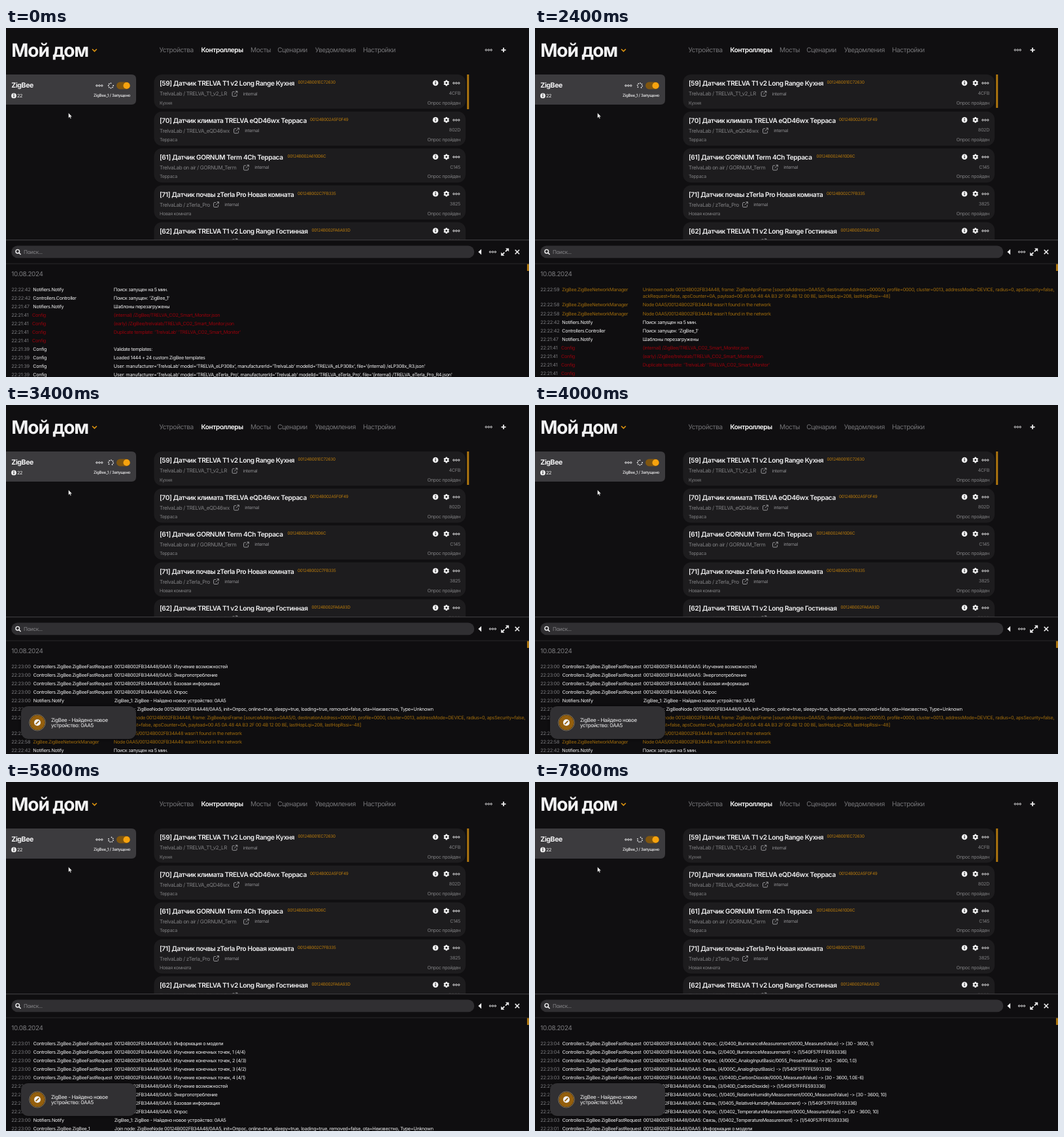
These frames come from a looping animation (800 by 533 pixels, 8000 ms). An HTML page:

```html
<!DOCTYPE html>
<html lang="ru">
<head>
<meta charset="utf-8">
<title>Мой дом</title>
<style>
  html, body { margin: 0; width: 100%; height: 100%; overflow: hidden; background: #100f11; }
  svg { display: block; width: 100%; height: 100%; }
  text { font-family: Inter, Roboto, sans-serif; letter-spacing: -.04em; text-rendering: geometricPrecision; }
</style>
</head>
<body>
<svg id="stage" viewBox="0 0 800 533" xmlns="http://www.w3.org/2000/svg"></svg>
<script>
const WHITE = '#f2f2f3', GRAY = '#808083', ORANGE = '#b87a0c', RED = '#98000b', AMBER = '#a06c0c', THUMB = '#ad760f';
const LOOP = 8000, TICK = 200;

// Drawing helpers returning SVG markup
const text = (x, y, size, fill, str, extra = '') =>
  `<text x="${x}" y="${y}" font-size="${size}" fill="${fill}" ${extra}>${str}</text>`;
const rect = (x, y, w, h, r, fill, extra = '') =>
  `<rect x="${x}" y="${y}" width="${w}" height="${h}" rx="${r}" fill="${fill}" ${extra}/>`;
const circle = (x, y, r, fill, extra = '') =>
  `<circle cx="${x}" cy="${y}" r="${r}" fill="${fill}" ${extra}/>`;
const line = (d, color, width = 1) =>
  `<path d="${d}" fill="none" stroke="${color}" stroke-width="${width}"/>`;
const shape = (d, fill, extra = '') => `<path d="${d}" fill="${fill}" ${extra}/>`;

const bold = 'font-weight="600"', heavy = 'font-weight="700"', right = 'text-anchor="end"';
const dots = (x, y) => [-3.9, 0, 3.9].map(dx =>
  circle(x + dx, y, 1.25, 'none', `stroke="${WHITE}" stroke-width=".9"`)).join('');
const info = (x, y, r) => circle(x, y, r, WHITE) +
  rect(x - .6, y - .8, 1.2, 3, 0, '#1c1b1d') + circle(x, y - 2.1, .75, '#1c1b1d');

function gear(x, y) {
  const teeth = [0, 60, 120].map(a =>
    rect(x - 1.2, y - 4.4, 2.4, 8.8, .5, WHITE, `transform="rotate(${a} ${x} ${y})"`)).join('');
  return teeth + circle(x, y, 3.4, WHITE) + circle(x, y, 1.4, '#1c1b1d');
}

const external = (x, y) =>
  line(`M${x - .5} ${y - 3}h-2.2q-1.2 0-1.2 1.2v4.6q0 1.2 1.2 1.2h4.6q1.2 0 1.2-1.2v-2.2` +
       `M${x - .8} ${y + .8}l4.6-4.6m-2.8 0h2.9v2.9`, '#98989b', 1);

const devices = [
  { title: '[59] Датчик TRELVA T1 v2 Long Range Кухня', id: '00124B001EC72630', idX: 446.5,
    model: 'TrelvaLab / TRELVA_T1_v2_LR', iconX: 350, room: 'Кухня', code: '4CFB' },
  { title: '[70] Датчик климата TRELVA eQD46wx Терраса', id: '00124B002A5F0F49', idX: 465,
    model: 'TrelvaLab / TRELVA_eQD46wx', iconX: 352.5, room: 'Терраса', code: '802D' },
  { title: '[61] Датчик GORNUM Term 4Ch Терраса', id: '00124B002A610D6C', idX: 430.5,
    model: 'TrelvaLab on air / GORNUM_Term', iconX: 367.5, room: 'Терраса', code: 'C145' },
  { title: '[71] Датчик почвы zTerla Pro Новая комната', id: '00124B002C7FB335', idX: 446,
    model: 'TrelvaLab / zTerla_Pro', iconX: 321.5, room: 'Новая комната', code: '3825' },
  { title: '[62] Датчик TRELVA T1 v2 Long Range Гостинная', id: '00124B002FA6A93D', idX: 467.5,
    model: 'TrelvaLab / TRELVA_T1_v2_LR', iconX: 350, room: 'Гостинная', code: '5C0C' },
];

const deviceCard = (d, i) => {
  const y = 71 + i * 56.4;
  return rect(226.5, y, 476.5, 52.3, 12, '#1d1c1e') +
    text(235, y + 17.3, 10.15, WHITE, d.title, bold) +
    text(d.idX, y + 14.3, 6.4, ORANGE, d.id) +
    text(235, y + 32.4, 8, GRAY, d.model) +
    external(d.iconX, y + 29.3) +
    text(d.iconX + 12.7, y + 31.6, 6.8, '#929295', 'internal') +
    text(235, y + 45.6, 7.05, GRAY, d.room) +
    info(657, y + 13, 4.3) + gear(673.7, y + 13) + dots(688.8, y + 13.2) +
    text(695, y + 31, 7.1, GRAY, d.code, right) +
    text(695, y + 45.6, 7.15, GRAY, 'Опрос пройден', right);
};

const tabs = [[234.5, 'Устройства'], [298.5, 'Контроллеры'], [374, 'Мосты'],
  [415.3, 'Сценарии'], [472.7, 'Уведомления'], [546, 'Настройки']];

const header = text(8.3, 43.6, 28.1, WHITE, 'Мой дом', heavy) +
  line('M132 32.2l3.4 3.4 3.4-3.4', '#e0960f', 1.5) +
  tabs.map(([x, name], i) => text(x, 36.9, 10.1, i === 1 ? '#fff' : '#747477', name, i === 1 ? bold : '')).join('') +
  dots(738.3, 33.6) + line('M757.6 33.6h7M761.1 30.1v7', WHITE, 1.7);

const sidebar = shape('M0 71H192q7 0 7 7V110q0 7-7 7H0z', '#3c3b3e') +
  text(8.3, 91, 10.6, WHITE, 'ZigBee', heavy) + info(12, 103.4, 3.9) +
  text(17, 106, 7.2, WHITE, '22') + dots(142.8, 88) +
  text(190.3, 105.4, 6.1, WHITE, 'ZigBee_1 / Запущено', right + ' font-weight="500"') +
  rect(169, 82.6, 21, 10.8, 5.4, '#805610') + circle(184.5, 88, 5.1, '#f6a30f');

// Seven dots around a circle, with the upper right one missing
const spinner = [0, 90, 135, 180, 225, 270, 315].map(a => {
  const r = a * Math.PI / 180;
  return circle((3.7 * Math.sin(r)).toFixed(2), (-3.7 * Math.cos(r)).toFixed(2), .9, WHITE);
}).join('');

const logPanel = rect(0, 323.5, 800, 210, 0, '#0f0e10') +
  line('M0 323.8H800', '#464548', 1) + line('M0 360H800', '#29282a', 1) +
  rect(8.3, 332.6, 708, 18.6, 9.3, '#302f32') +
  circle(17.8, 341.2, 2.8, 'none', `stroke="${WHITE}" stroke-width="1.4"`) + line('M19.8 343.2l2.8 2.8', WHITE, 1.6) +
  text(27, 345, 8, '#858588', 'Поиск...') +
  shape('M722.4 342l4.7-4.3v8.6z', WHITE) + dots(744.5, 342) +
  shape('M764 336.4h5.2v5.2zM762.4 347.8h-5.2v-5.2z', WHITE) +
  line('M767.5 338l-3.4 3.4M759 346.2l3.4-3.4', WHITE, 1.8) +
  line('M778.8 338.8l6.4 6.4m0-6.4l-6.4 6.4', WHITE, 1.6) +
  text(8.3, 379.4, 9.9, '#7c7c7f', '10.08.2024') +
  rect(797, 360.5, 3, 10.5, 0, THUMB);

const toast = rect(23, 460, 176, 50, 11, '#313033', 'filter="url(#shadow)"') +
  circle(48, 485, 12.2, '#1c1710', 'stroke="#b9a47e" stroke-width=".7"') +
  circle(48, 485, 11.3, '#945f0d') + circle(48, 485, 5, WHITE) + line('M45.6 487.4l4.8-4.8', '#945f0d', 1.6) +
  text(69, 483.6, 7.95, WHITE, 'ZigBee - Найдено новое') + text(69, 492.2, 7.95, WHITE, 'устройство: 0AA5');

const pageScrollbar = rect(793, 0, 7, 533, 0, '#f5f5f5') + rect(794.6, 9, 3.8, 515, 1.9, '#8c8c8c') +
  shape('M794.5 6.5h4l-2-3zM794.5 526.8h4l-2 3z', '#777');

// Log entries, newest first
const node = '00124B002FB34A48', manager = 'ZigBee.ZigBeeNetworkManager';
const fast = (sec, msg) => ({ time: '22:23:0' + sec, name: 'Controllers.ZigBee.ZigBeeFastRequest', lines: [`${node}/0AA5: ${msg}`] });
const entry = (time, name, msg, color = WHITE) => ({ time, name, lines: msg.split('\n'), color });
const bind = (sec, cluster) => fast(sec, `Связь, (${cluster}) -> (1/540F57FFFE593336)`);
const poll = (sec, attr, step) => fast(sec, `Опрос, (${attr}) -> (30 - 3600, ${step})`);
const config = msg => entry('22:21:41', 'Config', msg, RED);
const missing = entry('22:22:58', manager, `Node 0AA5/${node} wasn't found in the network`, AMBER);
const user = (model, file) => entry('22:21:39', 'Config', `User: manufacturer='TrelvaLab' model='TRELVA_${model}', ` +
  `manufacturerId='TrelvaLab' modelId='TRELVA_${model}', file='(internal) /${file}.json'`);

const log = [
  poll(4, '2/0400_IlluminanceMeasurement/0000_MeasuredValue', '1'),
  bind(4, '2/0400_IlluminanceMeasurement'),
  poll(4, '4/000C_AnalogInputBasic/0055_PresentValue', '1.0'),
  bind(3, '4/000C_AnalogInputBasic'),
  poll(3, '3/040D_CarbonDioxide/0000_MeasuredValue', '1.0E-6'),
  bind(3, '3/040D_CarbonDioxide'),
  poll(3, '1/0405_RelativeHumidityMeasurement/0000_MeasuredValue', '10'),
  bind(3, '1/0405_RelativeHumidityMeasurement'),
  poll(3, '1/0402_TemperatureMeasurement/0000_MeasuredValue', '10'),
  bind(3, '1/0402_TemperatureMeasurement'),
  fast(1, 'Информация о модели'),
  ...[1, 2, 3, 4].map(n => fast(0, `Изучение конечных точек, ${n} (4/${5 - n})`)),
  ...['Изучение возможностей', 'Энергопотребление', 'Базовая информация', 'Опрос'].map(msg => fast(0, msg)),
  entry('22:23:00', 'Notifiers.Notify', 'ZigBee_1: ZigBee - Найдено новое устройство: 0AA5'),
  entry('22:23:00', 'Controllers.ZigBee.ZigBee_1', `Join node: ZigBeeNode ${node}/0AA5, init=Опрос, online=true, ` +
    'sleepy=true, loading=true, removed=false, ota=Неизвестно, Type=Unknown'),
  entry('22:22:59', manager, `Unknown node ${node}, frame: ZigBeeApsFrame [sourceAddress=0AA5/0, ` +
    'destinationAddress=0000/0, profile=0000, cluster=0013, addressMode=DEVICE, radius=0, apsSecurity=false,\n' +
    'ackRequest=false, apsCounter=0A, payload=00 A5 0A 48 4A B3 2F 00 4B 12 00 8E, lastHopLqi=208, lastHopRssi=-48]', AMBER),
  missing, missing,
  entry('22:22:42', 'Notifiers.Notify', 'Поиск запущен на 5 мин.'),
  entry('22:22:42', 'Controllers.Controller', "Поиск запущен: 'ZigBee_1'"),
  entry('22:21:47', 'Notifiers.Notify', 'Шаблоны перезагружены'),
  config('(internal) /ZigBee/TRELVA_CO2_Smart_Monitor.json'),
  config('(early) /ZigBee/trelvalab/TRELVA_CO2_Smart_Monitor.json'),
  config("Duplicate template: 'TrelvaLab' 'TRELVA_CO2_Smart_Monitor'"),
  config(''),
  entry('22:21:39', 'Config', 'Validate templates:'),
  entry('22:21:39', 'Config', 'Loaded 1444 + 24 custom ZigBee templates'),
  user('eLP308x', 'eLP308x_R3'),
  user('eTerla_Pro', 'TRELVA_eTerla_Pro_R4'),
];

// [time, index of the newest visible entry]
const arrivals = [[0, 24], [2400, 21], [3200, 15], [4200, 10], [6200, 5], [7200, 0]];

function logRows(first) {
  let y = 401.6, out = '';
  for (let i = first; i < log.length && y < 545; i++) {
    const { time, name, lines, color = WHITE } = log[i];
    const shift = time.startsWith('22:23') ? 1 : time.endsWith('41') ? -1.2 : 0;
    out += text(8.3, y, 7.4, '#7c7c7f', time) + text(41.3 + Math.min(shift, .5), y, 7.2, color, name);
    lines.forEach((str, n) => out += text(164.8 + Math.max(shift, 0), y + n * 10.8, 7.25, color, str));
    y += 13.05 + (lines.length - 1) * 10.8;
  }
  return out;
}

const stage = document.getElementById('stage');
stage.innerHTML = `
  <defs>
    <clipPath id="listArea"><rect width="800" height="323.5"/></clipPath>
    <filter id="shadow" x="-10%" y="-20%" width="120%" height="140%" color-interpolation-filters="sRGB">
      <feDropShadow dx="0" dy="0" stdDeviation="2" flood-opacity=".6"/>
    </filter>
  </defs>
  ${rect(0, 0, 800, 533, 0, '#100f11')}${header}${sidebar}
  <g id="spinner">${spinner}</g>
  <g clip-path="url(#listArea)">${devices.map(deviceCard).join('')}</g>
  ${rect(705.2, 71, 3, 53, 0, THUMB, 'id="listThumb"')}
  ${logPanel}<g id="rows"></g><g id="toast">${toast}</g><g id="pageScrollbar">${pageScrollbar}</g>
  ${shape('M95.6 129.8v7.6l1.7-1.6 1.3 2.8 1.2-.6-1.2-2.6h2.4z', '#fff', 'stroke="#222" stroke-width=".4"')}`;

const part = Object.fromEntries(['spinner', 'listThumb', 'rows', 'toast', 'pageScrollbar']
  .map(id => [id, document.getElementById(id)]));
const show = (el, visible) => el.setAttribute('visibility', visible ? 'visible' : 'hidden');
let shownFirst = -1;

function render(now) {
  const t = Math.floor(now % LOOP / TICK) * TICK;

  part.spinner.setAttribute('transform', `translate(160.4 88) rotate(${t * .36})`);
  part.listThumb.setAttribute('height', t < 1800 ? 53 : 51);

  const first = arrivals.findLast(([start]) => t >= start)[1];
  if (first !== shownFirst) {
    part.rows.innerHTML = logRows(first);
    shownFirst = first;
  }

  // The rising toast briefly overflows the page, which brings up its scrollbar
  const rise = Math.min(1, Math.max(0, (t - 2800) / 600));
  part.toast.setAttribute('transform', `translate(0 ${74 * (1 - rise) ** 2})`);
  show(part.toast, rise > 0);
  show(part.pageScrollbar, rise > 0 && rise < 1);

  requestAnimationFrame(() => render(performance.now()));
}
render(performance.now());
</script>
</body>
</html>
```
